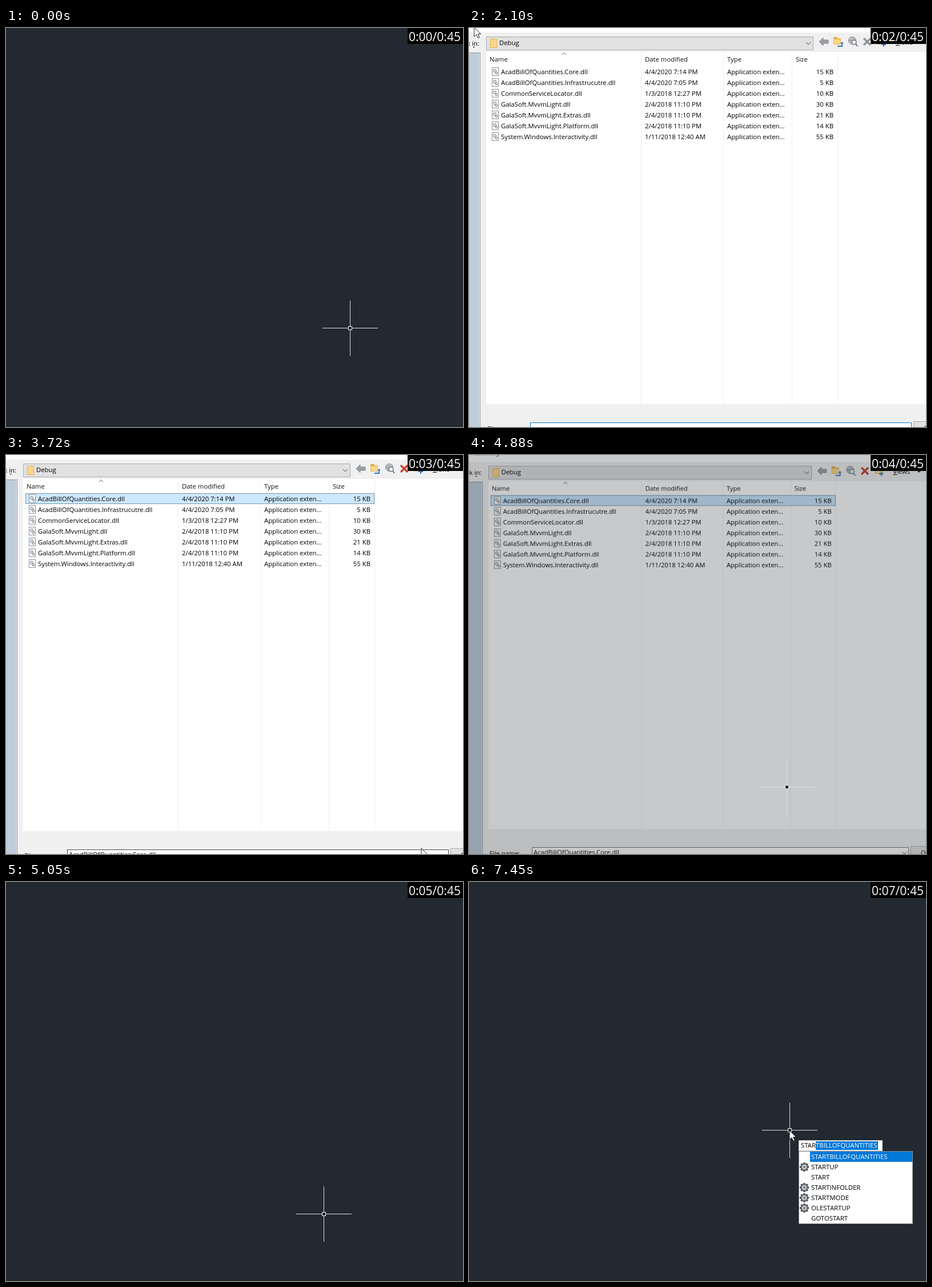
Write an HTML page with a canvas that moves like this. It is 800 by 700 pixels and loops after 8 s.

```html
<!DOCTYPE html>
<html lang="en">
<head>
<meta charset="utf-8">
<style>
html, body { margin: 0; width: 100%; height: 100%; overflow: hidden; background: #222930; }
canvas { display: block; }
</style>
</head>
<body>
<canvas id="stage" width="800" height="700"></canvas>
<script>
const LOOP = 8000, PAD = 60;
const BLUE = '#0078d7', BG = '#222930';
const stage = document.getElementById('stage').getContext('2d');
let g = stage;

const rect = (x, y, w, h, c) => { g.fillStyle = c; g.fillRect(x, y, w, h); };

function box(x, y, w, h, fill, line) {
  if (fill) rect(x, y, w, h, fill);
  g.strokeStyle = line;
  g.lineWidth = 1;
  g.strokeRect(x + .5, y + .5, w - 1, h - 1);
}

// y is the middle of the capitals
function text(s, x, y, { size = 11.33, color = '#000', align = 'left' } = {}) {
  g.font = `${size}px "Open Sans", "Noto Sans", sans-serif`;
  g.textAlign = align;
  g.fillStyle = color;
  g.fillText(s, x, y + 4);
  return g.measureText(s).width;
}

function poly(points, fill, line, width = 1, close = true) {
  g.beginPath();
  for (let i = 0; i < points.length; i += 2) g.lineTo(points[i], points[i + 1]);
  if (close) g.closePath();
  if (fill) { g.fillStyle = fill; g.fill(); }
  if (line) { g.strokeStyle = line; g.lineWidth = width; g.stroke(); }
}

function ring(x, y, r, fill, line, width = 1) {
  g.beginPath();
  g.arc(x, y, r, 0, 7);
  if (fill) { g.fillStyle = fill; g.fill(); }
  if (line) { g.strokeStyle = line; g.lineWidth = width; g.stroke(); }
}

function placed(x, y, draw) {
  g.save();
  g.translate(x, y);
  draw();
  g.restore();
}

// Latest entry whose time has come
const held = (track, t) => track.filter(k => k[0] <= t).pop();

// ---- command line menu ----

const icons = {
  n() {
    box(-7, -7, 14, 15, '#e4e4e4', '#555');
    rect(-6, -6, 12, 2, '#777');
    box(-6, -3, 4, 5, '#fff', '#777');
    rect(-1, -3, 6, 1, '#777');
    rect(-6, 2, 12, 5, '#333');
    text('.NET', 0, .5, { size: 5.5, color: '#fff', align: 'center' });
  },
  m() {
    poly([-7, 2, -4, -3, 0, -5, 4, -3, 7, 2, 4, 5, 1, 2, -3, 5], '#ddd', '#555');
    poly([-4, -3, 1, 2, 4, -3], null, '#666', 1, false);
    poly([-7, 2, 0, -5, 7, 2], null, '#888', .7, false);
  },
  s() {
    poly([-7, 6, -7, -2, -2, -7, -2, 2], '#eee', '#999');
    box(0, 1, 4, 6, '#eee', '#888');
    box(3, 3, 4, 4, '#fff', '#888');
  },
  g() {
    for (let i = 0; i < 8; i++) {
      g.save();
      g.rotate(i * Math.PI / 4);
      rect(-1.8, -8, 3.6, 4, '#50545a');
      g.restore();
    }
    ring(0, 0, 5.6, '#b4b8bd', '#50545a', 1.5);
    ring(0, 0, 2.2, '#555a60', '#e6e6e6');
  }
};

const COMMANDS = {
  load: { x: 619, y: 544, full: 'NETLOAD', open: 1220, end: 1770,
    keys: [[580, 1], [670, 2], [820, 3]],
    items: ['nNETLOAD', 'mNETWORKSRF (SURFNETWORK)', ' MULTILINETEXT (MTEXT)', ' LINETYPE',
      'sSECTIONPLANETOBLOCK', 'gPLINETYPE', 'gINETLOCATION'] },
  start: { x: 577, y: 453, full: 'STARTBILLOFQUANTITIES', open: 7450, end: LOOP,
    keys: [[6570, 1], [6810, 2], [6900, 3], [7050, 4]],
    items: [' STARTBILLOFQUANTITIES', 'gSTARTUP', ' START', 'gSTARTINFOLDER', 'gSTARTMODE',
      'gOLESTARTUP', ' GOTOSTART'] }
};

function command({ x, y, full, open, end, keys, items }, t) {
  const key = held(keys, t);
  if (!key || t >= end) return;
  const size = 11.4, typed = full.slice(0, key[1]), listed = t >= open;
  g.font = `${size}px "Open Sans", "Noto Sans", sans-serif`;
  const fullWidth = g.measureText(full).width;
  box(x, y, listed ? Math.round(fullWidth + 13) : 48, 19, '#fff', '#d0d0d0');
  const w = text(typed, x + 4, y + 9, { size });
  if (!listed) {
    rect(Math.round(x + 5 + w), y + 3, 1, 13, '#000');
    return;
  }
  rect(Math.round(x + 4 + w), y + 2, Math.round(fullWidth - w + 1), 15, BLUE);
  text(full.slice(typed.length), x + 4 + w, y + 9, { size, color: '#fff' });

  const top = y + 19;
  box(x, top, 200, 128, '#fff', '#8a8a8a');
  rect(x + 20, top + 1, 179, 18, BLUE);
  items.forEach((item, i) => {
    const mid = top + 10 + 18 * i;
    if (icons[item[0]]) placed(x + 10, mid, icons[item[0]]);
    text(item.slice(1), x + 22, mid, { size, color: i ? '#000' : '#fff' });
  });
}

// ---- file dialog ----

const FILES = [
  ['AcadBillOfQuantities.Core.dll', '4/4/2020 7:14 PM', 15],
  ['AcadBillOfQuantities.Infrastrucutre.dll', '4/4/2020 7:05 PM', 5],
  ['CommonServiceLocator.dll', '1/3/2018 12:27 PM', 10],
  ['GalaSoft.MvvmLight.dll', '2/4/2018 11:10 PM', 30],
  ['GalaSoft.MvvmLight.Extras.dll', '2/4/2018 11:10 PM', 21],
  ['GalaSoft.MvvmLight.Platform.dll', '2/4/2018 11:10 PM', 14],
  ['System.Windows.Interactivity.dll', '1/11/2018 12:40 AM', 55]
];

function folder(x, y, w, h) {
  rect(x, y, w * .5, 3, '#d9a53f');
  rect(x, y + 2, w, h - 2, '#e8b750');
  rect(x + 1, y + 4, w - 2, h - 5, '#f9d888');
}

function toolbar(picked) {
  poly([613, 24, 620, 17, 620, 21, 629, 21, 629, 27, 620, 27, 620, 31], '#9a9fa4', '#868b90');
  folder(638, 16, 13, 13);
  poly([645, 31, 652, 31, 652, 27, 650, 27, 653, 24, 656, 27, 654, 27, 654, 33, 645, 33], '#2f78c4');
  ring(671, 22, 6.5, '#b9bec3', '#858a90');
  poly([665, 22, 677, 22], null, '#858a90', 1, false);
  ring(674, 25, 4, '#e8ebee', '#6f757b', 1.5);
  poly([677, 28, 680, 32], null, '#6f757b', 2, false);
  const cross = picked ? '#c8442c' : '#8e9398';
  poly([691, 18, 703, 30], null, cross, 3.4, false);
  poly([703, 18, 691, 30], null, cross, 3.4, false);
  folder(715, 17, 14, 12);
  rect(725, 26, 2, 7, '#2f78c4');
  rect(722, 28, 8, 2, '#2f78c4');
  text('Views', 747, 25);
  rect(747, 30, 7, 1, '#000');
  poly([789, 23, 797, 23, 793, 27], '#222');
  text('Tools', 808, 25);
}

function fileRow([name, date, kb], i) {
  const y = 77 + 19 * i;
  box(40, y - 8, 12, 15, '#fff', '#8b8f94');
  ring(45, y - 2, 2.6, '#dfe4e8', '#7d858d');
  ring(48, y + 2, 2, '#dfe4e8', '#7d858d');
  text(name, 56, y);
  text(date, 308, y);
  text('Application exten...', 452, y);
  text(kb + ' KB', 638, y, { align: 'right' });
}

function dialog(t) {
  const picked = t >= 2630;
  rect(-PAD, -PAD, 920, 820, '#f0f0f0');
  rect(-PAD, -PAD, 920, 68, '#fff');
  text('Choose .NET Assembly', 50, -8, { align: 'right' });
  text('Look in:', 18, 27, { align: 'right' });
  rect(7, 33, 3, 1, '#000');

  box(-PAD, 43, 80, 720, '#bfccda', '#8c97a3');
  rect(18, 44, 1, 716, '#e8eef4');

  box(30, 15, 573, 24, '#e1e1e1', '#adadad');
  rect(37, 19, 12, 16, '#e6b45a');
  rect(38, 20, 10, 14, '#fbd58b');
  text('Debug', 53, 26);
  poly([590, 25, 594, 29, 598, 25], null, '#444', 1, false);
  toolbar(picked);

  rect(30, 42, 830, 618, '#fff');
  [301, 445, 565, 645].forEach(x => rect(x, 43, 1, 617, '#efefef'));
  [['Name', 36], ['Date modified', 308], ['Type', 452], ['Size', 572]]
    .forEach(([s, x]) => text(s, x, 55, { color: '#111' }));
  poly([163, 47, 166.5, 43.5, 170, 47], null, '#555', 1, false);

  if (picked) {
    rect(34, 67, 611, 19, '#cce8ff');
    g.setLineDash([1, 1]);
    box(34, 67, 611, 19, null, '#23405a');
    g.setLineDash([]);
  } else if (t >= 2400) {
    rect(34, 67, 611, 19, '#e5f3ff');
  }
  FILES.forEach(fileRow);

  text('File name:', 32, 703);
  rect(51, 709, 6, 1, '#000');
  const hover = t >= 3720 && t < 3800;
  box(107, 692, 668, 20, '#fff', picked ? (hover ? '#4a4a4a' : '#7a7a7a') : BLUE);
  if (picked) text(FILES[0][0], 110, 701);
  poly([763, 700, 767, 704, 771, 700], null, '#444', 1, false);
  box(778, 690, 90, 24, '#e1e1e1', '#adadad');
  text('Open', 796, 702);
  rect(796, 707, 8, 1, '#000');
}

// Time, opacity, scale
const FADE = [[0, 0, 1], [1850, .35, .935], [1930, .8, .985], [2000, 1, 1],
  [4880, .75, .988], [4960, .21, .963], [5050, 0, 1]];

const layer = document.createElement('canvas');
layer.width = 800 + 2 * PAD;
layer.height = 700 + 2 * PAD;
const layerCtx = layer.getContext('2d');

function window_(t) {
  const [, alpha, s] = held(FADE, t);
  if (!alpha) return;
  g = layerCtx;
  placed(PAD, PAD, () => dialog(t));
  g = stage;
  g.save();
  g.globalAlpha = alpha;
  g.translate(360 * (1 - s), 357 * (1 - s));
  g.scale(s, s);
  g.drawImage(layer, -PAD, -PAD);
  g.restore();
}

// ---- crosshair, pointer and selection prompt ----

const CORNER = [456, 413];
const CROSS = [[0, 602, 526], [1850], [4880, 556, 582], [5270, 555, 583],
  [5420, 547, 570], [5500, 516, 518], [5580, 478, 452], [5650, 459, 419], [5730, 456, 413],
  [5800, 460, 415], [5880, 472, 422], [5960, 517, 431], [6040, 559, 438], [6110, 575, 436],
  [6280, 564, 432], [6340, 561, 435]];

const POINTER = [[0], [580, 602, 527], [670], [1220, 602, 527], [1850, 440, 380], [1930, 230, 190],
  [2000, 70, 50], [2100, 9, -1], [2170, 16, 8], [2250, 40, 30], [2330, 74, 54], [2400, 98, 70],
  [2480, 108, 76], [2560, 112, 78], [2720, 180, 130], [2800, 340, 270], [2880, 530, 450],
  [2960, 680, 620], [3040, 726, 686], [3110], [3720, 727, 690], [3800, 712, 672],
  [3880, 698, 656], [3950, 687, 645], [4020, 680, 639], [4100, 677, 636],
  [4270, 630, 612], [4350, 575, 590], [4420, 556, 583], [4880],
  [6570, 561, 436], [6810], [7450, 561, 436]];

const prompting = t => t >= 5800 && t < 6110;

function crosshair(x, y, pick) {
  rect(x - 48, y, 97, 1, '#dcdfe2');
  rect(x, y - 48, 1, 97, '#dcdfe2');
  if (pick) box(x - 3, y - 3, 7, 7, BG, '#f0f0f0');
}

function prompt(x, y) {
  const [cx, cy] = CORNER;
  const dx = x - cx, dy = y - cy;
  box(cx, cy, dx + 1, dy + 1, '#25456f', '#c9d0d8');
  crosshair(x, y, false);

  box(x + 6, y - 17, 11, 11, '#000', '#f0f0f0');
  ring(x + 11.5, y - 11.5, 2.7, BLUE);

  box(x + 8, y + 12, 175, 23, '#999', '#050505');
  text('Specify opposite corner or', x + 13, y + 22);
  box(x + 168, y + 19, 11, 11, '#dce8f4', '#3d5f86');
  rect(x + 173, y + 21, 1, 4, '#111');
  poly([x + 170, y + 24, x + 177, y + 24, x + 173.5, y + 27], '#111');

  const size = 10.7;
  box(x + 186, y + 12, 53, 20, '#fff', '#111');
  rect(x + 191, y + 14, 39, 15, BLUE);
  text((dx * 4.4514).toFixed(4), x + 191, y + 22, { size, color: '#fff' });
  box(x + 242, y + 12, 47, 20, '#939393', '#050505');
  text((dy * 1.02296).toFixed(4), x + 247, y + 22, { size });
}

const arrow = () =>
  poly([0, 0, 0, 16, 4, 12.5, 6.7, 18.5, 9.3, 17.3, 6.6, 11.7, 11.5, 11.5], '#fff', '#111', .9);

function clock(t) {
  const s = [990, 2000, 3000, 4000, 4960, 6000, 6980].filter(k => k <= t).length;
  rect(703, 0, 97, 28, '#000');
  text(`0:0${s}/0:45`, 705, 19, { size: 21, color: '#fff' });
}

function render(t) {
  rect(0, 0, 800, 700, BG);
  window_(t);
  const [, x, y] = held(CROSS, t);
  if (prompting(t)) prompt(x, y);
  else if (x !== undefined) crosshair(x, y, true);
  command(COMMANDS.load, t);
  command(COMMANDS.start, t);
  const [, px, py] = held(POINTER, t);
  if (px !== undefined) placed(px, py, arrow);
  clock(t);
}

const began = performance.now();
function tick() {
  render((performance.now() - began) % LOOP);
  requestAnimationFrame(tick);
}
tick();
</script>
</body>
</html>
```
